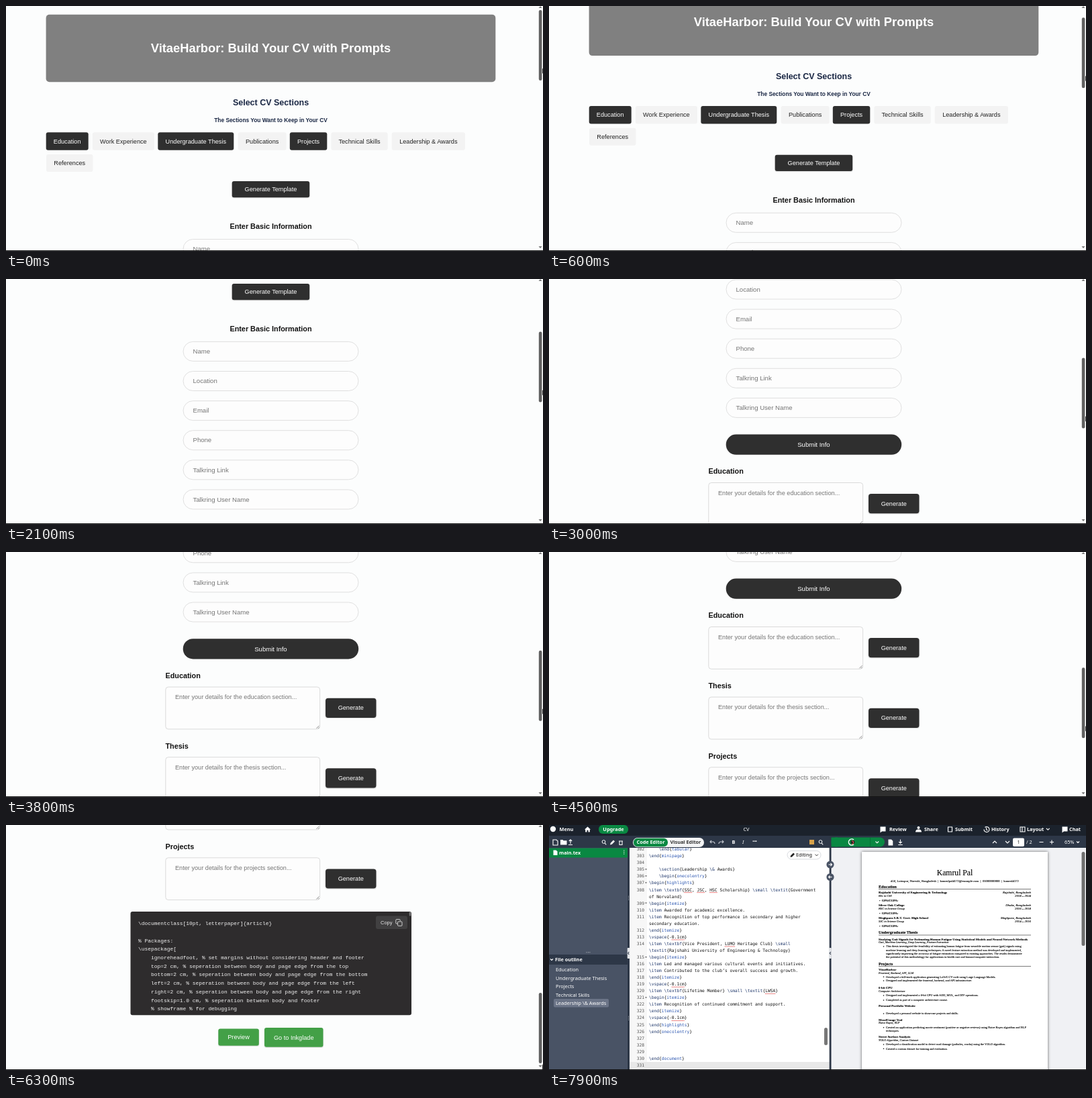
Write an HTML page that moves like this. It is 800 px wide and 365 px high and loops after 8000 ms.

```html
<!DOCTYPE html>
<html lang="en">
<head>
<meta charset="utf-8">
<title>CV builder demo</title>
<style>
html, body { margin: 0; width: 100%; height: 100%; overflow: hidden; background: #fcfdfd; }
svg { display: block; width: 100%; height: 100%; }
text { white-space: pre; font-family: "Liberation Sans", Arial, sans-serif; }
.ui text { font-family: "Noto Sans", sans-serif; }
.ui .code { font-family: "DejaVu Sans Mono", monospace; }
.ui .paper text { font-family: "Liberation Serif", serif; stroke: #111; stroke-width: .12px; }
.mono { font-family: "Liberation Mono", monospace; }
.sheet { filter: drop-shadow(0 0 2px #0009); }
</style>
</head>
<body>
<svg id="stage" viewBox="0 0 800 365"></svg>
<script>
const LOOP = 8000, SWITCH = 7500, PAGE_END = 854.5;
const BOLD = { 'font-weight': 700 }, SEMI = { 'font-weight': 600 };
const MID = { 'text-anchor': 'middle' }, END = { 'text-anchor': 'end' };
const ITALIC = { 'font-style': 'italic' };

function el(parent, tag, attrs = {}, content) {
  const node = document.createElementNS('http://www.w3.org/2000/svg', tag);
  for (const key in attrs) node.setAttribute(key, attrs[key]);
  if (content !== undefined) node.textContent = content;
  return parent.appendChild(node);
}
const box = (g, x, y, x2, y2, fill, rx = 0, more) =>
  el(g, 'rect', { x, y, width: x2 - x, height: y2 - y, fill, rx, ...more });
// y is the middle of the capital letters
const label = (g, x, y, s, size, fill, more) =>
  el(g, 'text', { x, y: y + size * 0.34, 'font-size': size, fill, ...more }, s);
const line = (g, d, stroke, width = 1, more) =>
  el(g, 'path', { d, stroke, 'stroke-width': width, fill: 'none', ...more });
const dot = (g, cx, cy, r, fill, more) => el(g, 'circle', { cx, cy, r, fill, ...more });

const stage = document.getElementById('stage');
const site = el(stage, 'g'), page = el(site, 'g');
const editor = el(stage, 'g', { class: 'ui' });

function button(x, y, x2, y2, s, fill, color = '#fff', r = 3, size = 9.17) {
  box(page, x, y, x2, y2, fill, r);
  label(page, (x + x2) / 2, (y + y2) / 2, s, size, color, MID);
}
function raised(x, y, x2, y2, ...rest) {
  box(page, x - .5, y + .5, x2 + .5, y2 + 1.2, '#000', 3, { opacity: .1 });
  button(x, y, x2, y2, ...rest);
}

function buildSite() {
  const dark = '#2f2f2f', navy = '#1a2744', ink = '#111';
  box(site, 0, 0, 800, 365, '#fcfdfd');
  site.appendChild(page);
  box(page, 59.6, 12.8, 729.3, 113.3, '#808080', 5);
  label(page, 394.5, 63, 'VitaeHarbor: Build Your CV with Prompts', 18.33, '#fff', { ...BOLD, ...MID });
  label(page, 394.5, 143.8, 'Select CV Sections', 12.5, navy, { ...BOLD, ...MID });
  label(page, 394.5, 170.6, 'The Sections You Want to Keep in Your CV', 8.33, navy, { ...BOLD, ...MID });

  const tabs = [
    [59.7, 122.7, 'Education', 1], [128.8, 221, 'Work Experience'], [226.3, 339.3, 'Undergraduate Thesis', 1],
    [345.6, 417.7, 'Publications'], [422.8, 478.3, 'Projects', 1], [484.3, 568.7, 'Technical Skills'],
    [574.7, 684, 'Leadership & Awards']
  ];
  for (const [x, x2, s, on] of tabs) button(x, 188.3, x2, 214.8, s, on ? dark : '#f3f3f3', on ? '#fff' : '#222');
  button(60, 221, 129.5, 247, 'References', '#f3f3f3', '#222');
  raised(336.7, 261, 452.2, 285.3, 'Generate Template', dark);

  label(page, 394.5, 328.2, 'Enter Basic Information', 10.83, ink, { ...BOLD, ...MID });
  ['Name', 'Location', 'Email', 'Phone', 'Talkring Link', 'Talkring User Name'].forEach((s, i) => {
    const y = 362 + 44.1 * i;
    box(page, 264, y - 14.5, 525, y + 14.5, '#fdfdfd', 14.5, { stroke: '#d8d8d8', 'stroke-width': .8 });
    label(page, 278.5, y, s, 9.58, '#757575');
  });
  button(263.7, 622.2, 525.2, 652.4, 'Submit Info', dark, '#fff', 15, 9.58);

  ['Education', 'Thesis', 'Projects'].forEach((s, i) => {
    const y = 677.3 + 104.6 * i;
    label(page, 237.5, y, s, 10.83, ink, BOLD);
    box(page, 237.8, y + 16.8, 467.6, y + 79.6, '#fdfdfd', 4, { stroke: '#d2d2d2', 'stroke-width': .8 });
    label(page, 252, y + 31.8, `Enter your details for the ${s.toLowerCase()} section...`, 9.17, '#757575');
    line(page, `M462.5 ${y + 78.5}l4-4M465 ${y + 78.5}l1.5-1.5`, '#555', .7);
    raised(476, y + 33.4, 551.5, y + 62.6, 'Generate', dark, '#fff', 4);
  });

  box(page, 185.5, 983.4, 604, 1137.8, '#2e2c2d', 3);
  const margin = side => `    ${side}=2 cm, % seperation between body and page edge from the ${side}`;
  ['\\documentclass[10pt, letterpaper]{article}', '', '% Packages:', '\\usepackage[',
    '    ignoreheadfoot, % set margins without considering header and footer',
    ...['top', 'bottom', 'left', 'right'].map(margin),
    '    footskip=1.0 cm, % seperation between body and footer',
    '    % showframe % for debugging'
  ].forEach((s, i) => label(page, 197, 1000.9 + 12.72 * i, s, 7.92, '#f0f0f0', { class: 'mono' }));
  box(page, 600.8, 984, 603.4, 990, '#777', 1);
  box(page, 551, 990, 598, 1009.5, '#414041', 3);
  label(page, 558, 999.6, 'Copy', 7.5, '#e4e4e4');
  box(page, 583.6, 998.4, 590, 1004.8, 'none', 1, { stroke: '#ddd', 'stroke-width': .9 });
  line(page, 'M583 1001.5h-1.2q-1 0-1-1v-4.4q0-1 1-1h4.4q1 0 1 1v1.4', '#ddd', .9);
  raised(316.3, 1158, 376.8, 1183.3, 'Preview', '#43a047');
  raised(385, 1156.5, 472.5, 1185.3, 'Go to Inkglade', '#43a047');

  el(site, 'path', { d: 'M793.5 3l2.5-2.8 2.5 2.8zM793.5 358l2.5 3 2.5-3z', fill: '#777' });
}

function buildCode() {
  const pitch = 6.25 * 0.602, left = 149, step = 10.05;
  box(editor, 120, 33, 418, 365, '#fff');
  box(editor, 120, 33, 146, 365, '#f7f7f7');
  box(editor, 120, 353, 418, 363, '#e8e8e8');
  // a leading "+" marks the wrapped rest of the line above
  const rows = `    \\end{tabular}
\\end{minipage}

    \\section{Leadership \\& Awards}
    \\begin{onecolentry}
\\begin{highlights}
\\item \\textbf{SSC, JSC, HSC Scholarship} \\small \\textit{Government
+of Norvaland}
\\begin{itemize}
\\item Awarded for academic excellence.
\\item Recognition of top performance in secondary and higher
+secondary education.
\\end{itemize}
\\vspace{-0.1cm}
\\item \\textbf{Vice President, LUMO Heritage Club} \\small
+\\textit{Rajshahi University of Engineering & Technology}
\\begin{itemize}
\\item Led and managed various cultural events and initiatives.
\\item Contributed to the club’s overall success and growth.
\\end{itemize}
\\vspace{-0.1cm}
\\item \\textbf{Lifetime Member} \\small \\textit{LWSA}
\\begin{itemize}
\\item Recognition of continued commitment and support.
\\end{itemize}
\\vspace{-0.1cm}
\\end{highlights}
\\end{onecolentry}



\\end{document}
`.split('\n');
  let number = 302;
  rows.forEach((row, i) => {
    const y = 36.1 + step * i, wrapped = row[0] === '+';
    if (!wrapped) label(editor, 142, y, number++, 6.25, '#555', { class: 'code', ...END });
    const s = wrapped ? row.slice(1) : row;
    if (/\\(begin|section)/.test(s)) el(editor, 'path', { d: `M143 ${y - 1}h3l-1.5 2z`, fill: '#666' });
    const text = label(editor, left, y, '', 6.25, '#111', { class: 'code' });
    let env = false;
    for (const part of s.split(/(\\[a-z]+|\\&|[{}])/)) {
      const isCommand = part[0] === '\\';
      const fill = isCommand ? '#1c3468' : env && !/[{}]/.test(part) ? '#2a55b0' : '#111';
      el(text, 'tspan', { fill }, part);
      if (isCommand) env = /begin|end/.test(part);
      if (part === '}') env = false;
    }
    for (const m of s.matchAll(/SSC|JSC|HSC|LUMO|LWSA|0\.1cm/g))
      line(editor, `M${left + m.index * pitch} ${y + 4.2}h${m[0].length * pitch}`, '#d33', 1, { 'stroke-dasharray': '1.2 .8' });
  });
  box(editor, 355, 38.5, 405, 51, '#fff', 6.3, { stroke: '#c8ccd2', 'stroke-width': .7 });
  el(editor, 'path', { d: 'M359.5 48l.6-2.5 4-4 1.9 1.9-4 4z', fill: '#222' });
  label(editor, 368, 44.8, 'Editing', 7.3, '#111');
  line(editor, 'M396.5 43.7l2.2 2.2 2.2-2.2', '#333', 1);
  box(editor, 410, 302, 415, 328, '#777', 2.5);
}

function buildPaper() {
  box(editor, 420, 33, 800, 365, '#f0f1f4');
  box(editor, 466, 40, 743, 375, '#fff', 0, { class: 'sheet' });
  box(editor, 793.5, 40, 798.5, 180, '#6e6e6e', 2.5);
  const paper = el(editor, 'g', { class: 'paper' }), ink = '#000';
  const bold = (y, s) => label(paper, 491, y, s, 4.82, ink, BOLD);
  const sub = (y, s) => label(paper, 491, y, s, 4.3, ink, ITALIC);
  const right = (y, s) => label(paper, 718, y, s, 4.8, ink, { ...ITALIC, ...END });
  const plain = (y, s) => label(paper, 502, y, s, 4.35, ink);
  const point = (y, s) => { dot(paper, 498.5, y, .8, ink); plain(y, s); };
  const head = (y, s) => {
    label(paper, 491, y, s, 6.15, ink, BOLD);
    line(paper, `M491 ${y + 4}H718`, '#222', .6);
  };
  label(paper, 604.5, 71, 'Kamrul Pal', 11.7, ink, MID);
  label(paper, 604.5, 83, '418, Lotuspur, Norvale, Bangladesh  |  kamrulpal4172@example.com  |  01000000000  |  kamrul4172', 4.7, ink, MID);

  head(91.5, 'Education');
  [['Rajshahi University of Engineering & Technology', 'Rajshahi, Bangladesh', 'BSc in CSE', '2018 – 2024'],
   ['Silver Oak College', 'Dhaka, Bangladesh', 'HSC in Science Group', '2016 – 2018'],
   ['Meghpara S.R.T. Govt. High School', 'Meghpara, Bangladesh', 'SSC in Science Group', '2014 – 2016']
  ].forEach(([school, place, degree, years], i) => {
    const y = 100.2 + 18.9 * i;
    bold(y, school); right(y, place);
    sub(y + 5.6, degree); right(y + 5.6, years);
    label(paper, 492, y + 12.4, '•  GPA/CGPA:', 4.5, ink, BOLD);
  });

  head(160, 'Undergraduate Thesis');
  bold(170, 'Studying Gait Signals for Estimating Human Fatigue Using Statistical Models and Neural Network Methods');
  sub(175, 'Gait, Machine Learning, Deep Learning, Feature Extraction');
  point(181, 'This thesis investigated the feasibility of estimating human fatigue from wearable motion sensor (gait) signals using');
  plain(186.3, 'machine learning and deep learning techniques. A novel feature extraction method was developed and implemented,');
  plain(191.4, 'significantly improving the accuracy of fatigue estimation compared to existing approaches. The results demonstrate');
  plain(196.5, 'the potential of this methodology for applications in health care and human-computer interaction.');

  head(206.5, 'Projects');
  bold(215, 'VitaeHarbor'); sub(220.2, 'Frontend, Backend, API, LLM');
  point(226.3, 'Developed a full-stack application generating LaTeX CV code using Large Language Models.');
  point(232, 'Designed and implemented the frontend, backend, and API infrastructure.');
  bold(242, '6-bit CPU'); sub(247.2, 'Computer Architecture');
  point(254, 'Designed and implemented a 6-bit CPU with ADD, MUL, and DIV operations.');
  point(261, 'Completed as part of a computer architecture course.');
  bold(269, 'Personal Portfolio Website');
  point(281, 'Developed a personal website to showcase projects and skills.');
  bold(290, 'MoodGauge Tool'); sub(295, 'Naive Bayes, NLP');
  point(301.8, 'Created an application predicting movie sentiment (positive or negative reviews) using Naive Bayes algorithm and NLP');
  plain(307, 'techniques.');
  bold(315, 'Street Surface Analysis'); sub(320.2, 'YOLO Algorithm, Custom Dataset');
  point(327, 'Developed a classification model to detect road damage (potholes, cracks) using the YOLO algorithm.');
  point(333.2, 'Created a custom dataset for training and evaluation.');
}

function buildEditor() {
  const top = '#1b222c', bar = '#2d3747', side = '#495365', green = '#098842', white = '#fff';
  const ui = (x, y, s, more, fill = white) => label(editor, x, y, s, 7.3, fill, more);
  const icon = (d, stroke = white) => line(editor, d, stroke, 1.1);
  const solid = d => el(editor, 'path', { d, fill: white });
  const lens = (x, y) => {
    dot(editor, x, y, 2.4, 'none', { stroke: white });
    icon(`M${x + 1.7} ${y + 2}l2 2.3`);
  };
  buildCode();
  buildPaper();
  box(editor, 0, 0, 800, 34, bar);
  box(editor, 0, 0, 800, 16, top);
  box(editor, 0, 34, 118, 365, side);
  box(editor, 117, 17, 120, 365, bar);
  box(editor, 417.7, 17, 420.5, 365, bar);

  dot(editor, 6, 6, 4.2, white);
  ui(15.5, 6.3, 'Menu', SEMI);
  solid('M53 6.8l4.5-4.3 4.5 4.3h-1.2v3.7h-2.3v-2.7h-2v2.7h-2.3v-3.7z');
  box(editor, 74, 0, 118, 13, green, 6);
  ui(96, 6.3, 'Upgrade', { ...BOLD, ...MID });
  ui(294, 6.3, 'CV', MID);
  [[507, 'Review'], [559, 'Share'], [605, 'Submit'], [659, 'History'], [712, 'Layout'], [775, 'Chat']]
    .forEach(([x, s]) => ui(x, 6.3, s, SEMI));
  solid('M493.5 2.5h8v7h-5.5l-2.5 2zM546 10.5q0-4 4.5-4t4.5 4zM764.5 2.5h8v7h-5.5l-2.5 2z');
  dot(editor, 550.5, 4, 2, white);
  icon('M594.5 3h6v7h-6zM648 6.5a4 4 0 1 0 1.5-3M651.5 4v3l2 1M702 3h7v7h-7zM705 3v7M741 5l2.3 2.3 2.3-2.3');

  icon('M6 22h5l2 2v6H6zM29 29.5h6M32 28v-6M29.8 24l2.2-2.2 2.2 2.2M104 24h6M105 24v5.5h4V24');
  solid('M17 22h3.5l1 1.3h5v6.2H17zM91 29.5l.8-2.8 4.2-4.2 2 2-4.2 4.2z');
  lens(81.5, 25);
  box(editor, 0, 34.5, 117, 48.5, green);
  solid('M6.5 37.5h4l2 2v5.5h-6z');
  ui(15, 41.6, 'main.tex', SEMI);
  ui(108, 41, '⋮', BOLD);
  ui(58.5, 190, '⋯', MID);
  for (const y of [109, 288]) ui(118.5, y, '⋮', MID);
  box(editor, 0, 193, 117, 208, bar);
  icon('M2 199.5l2 2 2-2');
  ui(9, 200.8, 'File outline', SEMI);
  box(editor, 7, 259, 89, 271.5, '#6b7487', 2);
  ['Education', 'Undergraduate Thesis', 'Projects', 'Technical Skills', 'Leadership \\& Awards']
    .forEach((s, i) => ui(10, 215.5 + 12.55 * i, s));

  box(editor, 125, 19, 231, 33, '#f4f5f6', 7);
  box(editor, 126, 19.8, 177, 32.2, green, 6);
  ui(151.5, 26, 'Code Editor', { ...SEMI, ...MID });
  ui(203.5, 26, 'Visual Editor', { ...SEMI, ...MID }, '#333');
  icon('M242 23l-2 2 2 2M240 25h4q3 0 3 3M258 23l2 2-2 2M260 25h-4q-3 0-3 3', '#c4c8cf');
  ui(272.5, 26, 'B', BOLD);
  ui(288, 26, 'I', ITALIC);
  ui(303, 25, '•••', { 'letter-spacing': -.6 });
  box(editor, 388, 22, 395, 29, '#d8a24a');
  lens(404.5, 25);

  box(editor, 420.5, 18.5, 500, 32.5, green, 7);
  box(editor, 420.5, 18.5, 430, 32.5, green);
  line(editor, 'M478.5 19v13', '#076b34', .8);
  icon('M486.5 24.5l2.3 2.3 2.3-2.3M523.5 21.5v5.5M521.3 25l2.2 2.2 2.2-2.2M520.3 29.5h6.5M661 27l3-3 3 3M680 24l3 3 3-3M730.5 25.5h6M746 25.5h6M749 22.5v6M786 24.5l2 2 2-2');
  solid('M505.5 21.5h4.5l2.3 2.3v6.7h-6.8z');
  line(editor, 'M454 22a4.6 4.6 0 1 0 0 7', white, 1.5);
  dot(editor, 452.5, 25.5, 2.8, '#222');
  line(editor, 'M451 23.5a2.4 2.4 0 0 1 0 5', '#d55', 1.1);
  box(editor, 691, 19.5, 708, 32, white, 2);
  ui(699.5, 25.8, '1', MID, '#222');
  ui(711, 25.8, '/ 2');
  ui(768, 25.8, '65%');
  for (const [y, d] of [[59, 'M416.5 59h5M419.5 57l2 2-2 2'], [77.5, 'M421.5 77.5h-5M418.5 75.5l-2 2 2 2']]) {
    dot(editor, 419, y, 5.6, side);
    icon(d);
  }
  for (const x of [118.5, 419]) {
    box(editor, x - 1.8, 183, x + 1.8, 199, '#e4e6ea', 1);
    icon(`M${x + .7} 189l-1.5 2 1.5 2`, bar);
  }
}

buildSite();
buildEditor();
const thumb = box(site, 793.8, 0, 798.4, 105, '#606060', 2.3);
const pointer = el(site, 'path', { d: 'M0 0v9.5l2.3-2 1.6 3.6 1.5-.7-1.6-3.5h3z', fill: '#222', stroke: '#fff', 'stroke-width': .6 });
box(stage, 0, 364, 800, 365, '#111');

// linear interpolation through [time, value] pairs
function track(keys, t) {
  const i = keys.findIndex(k => t < k[0]);
  if (i === 0) return keys[0][1];
  if (i < 0) return keys[keys.length - 1][1];
  const [t0, a] = keys[i - 1], [t1, b] = keys[i];
  return a + (b - a) * (t - t0) / (t1 - t0);
}
const scrollKeys = [[300, 0], [1200, 117.6], [3000, 390.6], [4500, 582.6], [5400, 722.4], [6300, PAGE_END]];

function draw(now) {
  const t = Math.floor(now % LOOP / 100) * 100;
  const scroll = track(scrollKeys, t), top = 6 + 244 * scroll / PAGE_END;
  page.setAttribute('transform', `translate(0 ${-scroll})`);
  thumb.setAttribute('y', top);
  const x = track([[6500, 798.7], [7100, 430]], t);
  const y = t < 6500 ? top + 86 + track([[6000, 0], [6300, 20]], t) : track([[6500, 356], [7100, 318]], t);
  pointer.setAttribute('transform', `translate(${x} ${y})`);
  site.style.display = t < SWITCH ? '' : 'none';
  editor.style.display = t < SWITCH ? 'none' : '';
  requestAnimationFrame(draw);
}
requestAnimationFrame(draw);
</script>
</body>
</html>
```
